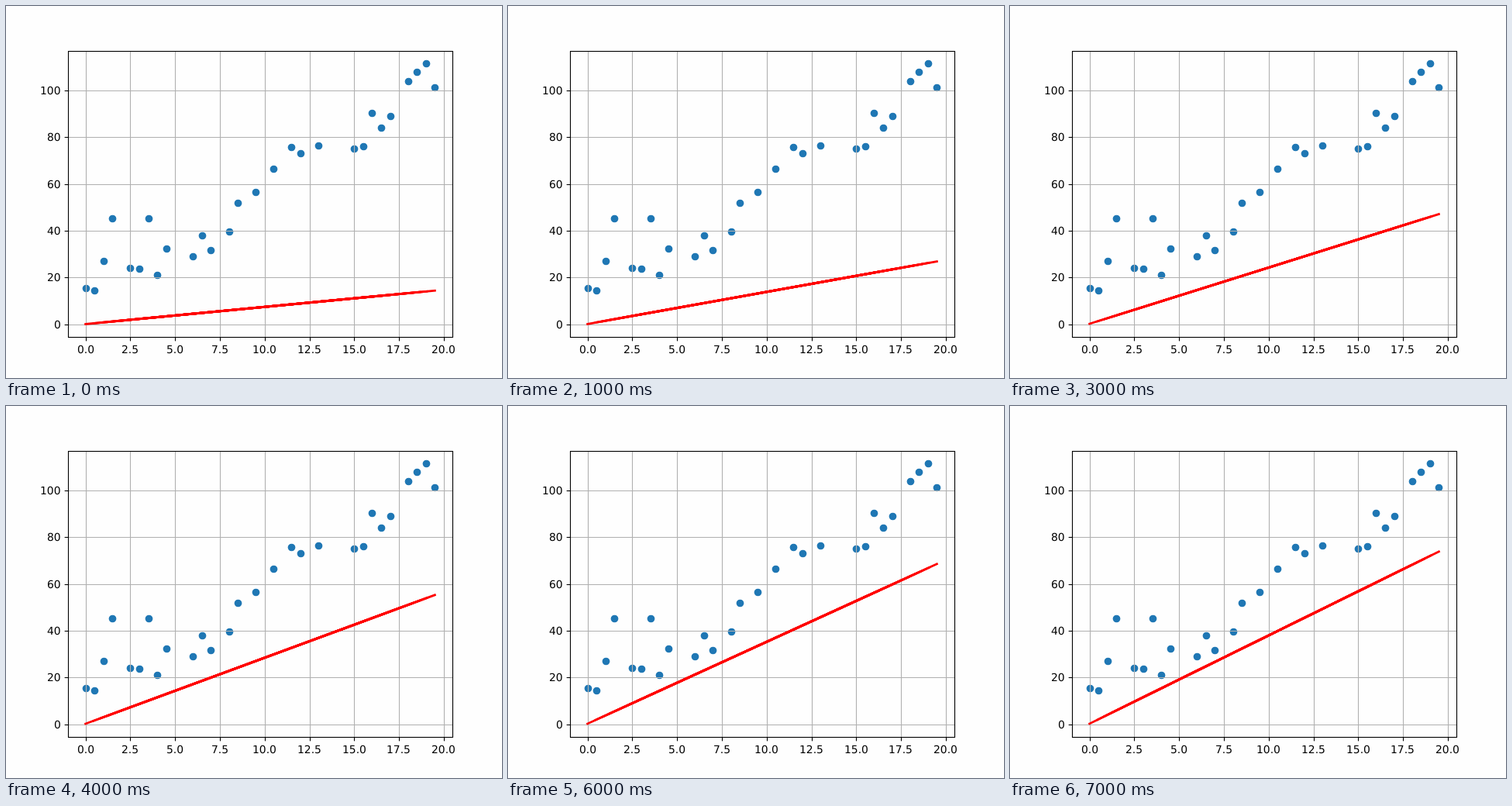
These frames come from a looping animation (640x480 px, 8 s). An HTML page with a canvas:

```html
<!DOCTYPE html>
<html>
<head>
<meta charset="utf-8">
<style>
  html, body { margin: 0; overflow: hidden; background: #fefefe; }
  canvas { display: block; }
</style>
</head>
<body>
<canvas id="stage" width="640" height="480"></canvas>
<script>
const ctx = document.getElementById('stage').getContext('2d');
const LEFT = 80.5, RIGHT = 576.5, TOP = 58.5, BOTTOM = 427.5;
const STEP_MS = 1000, STEPS = 8;
const THIN = 1.11, TICK = 4.86, GRID = '#b0b0b0';

const mapX = v => 102.6 + v * 23.117;
const mapY = v => 410.5 - v * 3.0145;
const snap = p => Math.floor(p + 0.5) + 0.5;

// Screen heights of the samples, one slot per half unit of x; empty slots have no dot.
const samples = [
  364, 367, 329, 274, , 338, 339, 274, 347, 313, , , 323, 296, 315, , 291, 254, , 240,
  , 210, , 182, 190, , 180, , , , 184, 181, 138, 157, 142, , 97, 85, 74, 105
];

function line(x1, y1, x2, y2, color, width = THIN, cap = 'butt') {
  ctx.strokeStyle = color;
  ctx.lineWidth = width;
  ctx.lineCap = cap;
  ctx.beginPath();
  ctx.moveTo(x1, y1);
  ctx.lineTo(x2, y2);
  ctx.stroke();
}

// Aligns the inked part of the text and starts it on a whole pixel.
function label(text, anchor, baseline, align) {
  const box = ctx.measureText(text);
  const bearing = -box.actualBoundingBoxLeft;
  const ink = box.actualBoundingBoxRight - bearing + 0.4;
  const x = Math.round(anchor - ink * align) - Math.floor(bearing);
  ctx.fillText(text, x, baseline);
}

function drawSamples() {
  ctx.fillStyle = '#1f77b4';
  samples.forEach((y, i) => {
    ctx.beginPath();
    ctx.arc(snap(mapX(i / 2)), y + 0.5, TICK, 0, Math.PI * 2);
    ctx.fill();
  });
}

function drawAxes() {
  ctx.font = '13.89px "DejaVu Sans", sans-serif';
  ctx.textRendering = 'geometricPrecision';
  ctx.fillStyle = '#000';
  for (let v = 0; v <= 20; v += 2.5) {
    const x = snap(mapX(v));
    line(x, TOP, x, BOTTOM, GRID);
    line(x, BOTTOM, x, BOTTOM + TICK, '#000');
    label(v.toFixed(1), mapX(v), 448, 0.5);
  }
  for (let v = 0; v <= 100; v += 20) {
    const y = snap(mapY(v));
    line(LEFT, y, RIGHT, y, GRID);
    line(LEFT - TICK, y, LEFT, y, '#000');
    label(String(v), 70.3, Math.round(mapY(v) + 5), 1);
  }
}

// The fit approaches its limit geometrically, one step at a time.
function drawFit(step) {
  const progress = 1 - 0.868 ** step;
  const x0 = mapX(0), x1 = mapX(19.5);
  const y0 = 410.4 - 0.8 * progress, y1 = 367.2 - 285.3 * progress;
  const at = k => [x0 + (x1 - x0) * k, y0 + (y1 - y0) * k];
  line(x0, y0, x1, y1, '#f00', 2.78, 'square');
  // Repeated passes harden the edges towards the middle.
  for (let k = 0.02; k < 0.21; k += 0.02) {
    line(...at(k), ...at(1 - k), '#f00', 2.78);
  }
}

function draw(now) {
  ctx.fillStyle = '#fefefe';
  ctx.fillRect(0, 0, 640, 480);
  drawSamples();
  drawAxes();
  drawFit(Math.floor(now / STEP_MS) % STEPS);
  ctx.strokeStyle = '#000';
  ctx.lineWidth = THIN;
  ctx.strokeRect(LEFT, TOP, RIGHT - LEFT, BOTTOM - TOP);
}

const start = performance.now();
function tick() {
  draw(performance.now() - start);
  requestAnimationFrame(tick);
}
tick();
</script>
</body>
</html>
```
